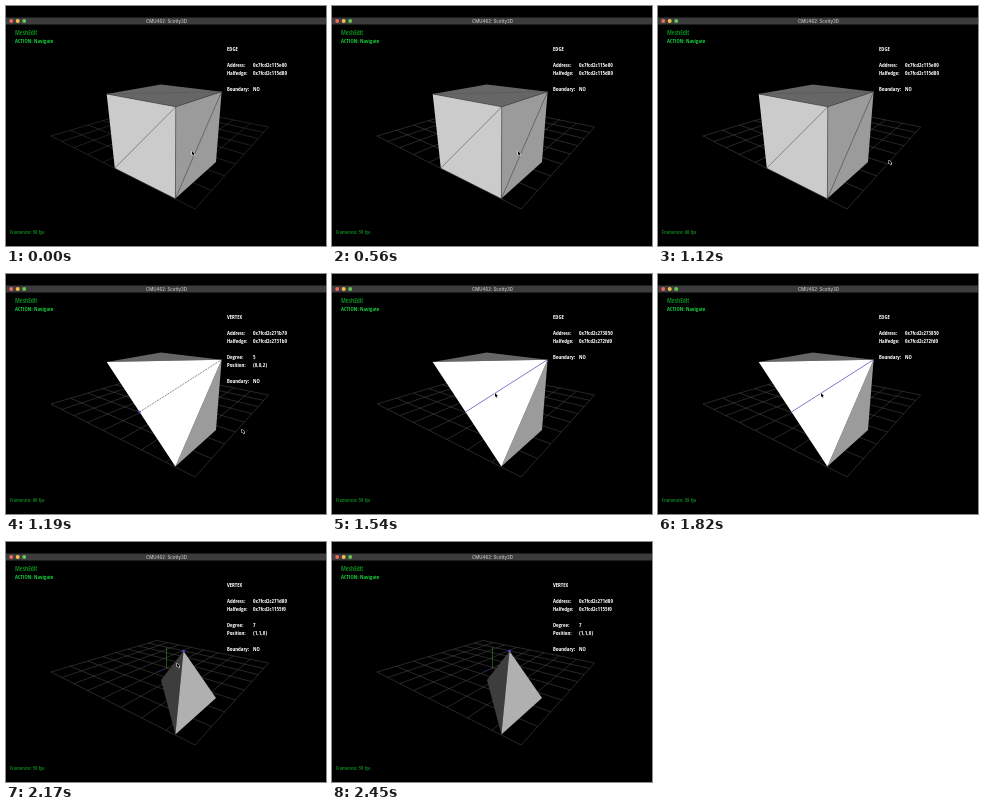
An HTML page with a canvas for the animation above (2940 ms loop, 320 by 240 pixels).

```html
<!DOCTYPE html>
<html lang="en">
<head>
<meta charset="utf-8">
<title>Mesh editor</title>
<style>
html, body { margin: 0; width: 100%; height: 100%; overflow: hidden; background: #000; }
canvas { display: block; }
</style>
</head>
<body>
<canvas width="320" height="240"></canvas>
<script>
const ctx = document.querySelector('canvas').getContext('2d');
const LOOP = 2940, STEP = 70;
const OSD = '"Open Sans Condensed", "Open Sans", sans-serif';

// Cube corners: top a-d, bottom e-h
const a = [100.7, 88], b = [154.8, 78.6], c = [215.6, 85.7], d = [169.8, 100.8];
const e = [108.8, 162], f = [169.4, 192.5], g = [210, 156], h = [155, 138];
const mid = [133.5, 138], apex = [177.5, 109];

// Ground corners as x, y, perspective weight
const left = [45, 130, .465], back = [151, 98.5, .737];
const right = [262.6, 121, .535], front = [189, 203, .263];

const edge = (address, halfedge) =>
  ['EDGE', , 'Address:|' + address, 'Halfedge:|' + halfedge, , 'Boundary:|NO'];
const vertex = (address, halfedge, degree, position) =>
  ['VERTEX', , 'Address:|' + address, 'Halfedge:|' + halfedge, ,
    'Degree:|' + degree, 'Position:|' + position, , 'Boundary:|NO'];

const panels = [
  [0, edge('0x7fcd2c115e00', '0x7fcd2c115d80')],
  [1190, vertex('0x7fcd2c271b70', '0x7fcd2c2731b0', 5, '(0,0,2)')],
  [1470, edge('0x7fcd2c273850', '0x7fcd2c272fd0')],
  [1890, vertex('0x7fcd2c271d80', '0x7fcd2c1155f0', 7, '(1,1,0)')]
];
const rates = [[0, 58], [560, 59], [980, 60], [1470, 59]];
const pointer = [
  [0, 186, 145], [910, 186, 145], [1120, 231, 154], [1190, 236, 155], [1260, 236, 155],
  [1470, 163, 119], [1820, 163, 119], [1890, 171, 121], [LOOP, 171, 121]
];

const current = (list, t) => list.findLast(item => item[0] <= t)[1];

function text(str, x, y, color, font) {
  ctx.font = font;
  ctx.fillStyle = color;
  ctx.fillText(str, x, y);
}

function trace(points) {
  ctx.beginPath();
  points.forEach(p => ctx.lineTo(p[0], p[1]));
}

function face(color, ...points) {
  trace(points);
  ctx.closePath();
  ctx.fillStyle = color;
  ctx.fill();
}

function line(color, width, ...points) {
  trace(points);
  ctx.strokeStyle = color;
  ctx.lineWidth = width;
  ctx.stroke();
}

function dot(color, x, y, r) {
  ctx.beginPath();
  ctx.arc(x, y, r, 0, 7);
  ctx.fillStyle = color;
  ctx.fill();
}

function between(p, q, k) {
  const wp = p[2] * (1 - k), wq = q[2] * k, w = wp + wq;
  return [(p[0] * wp + q[0] * wq) / w, (p[1] * wp + q[1] * wq) / w];
}

function ground(color) {
  for (let k = 0; k <= 1; k += 1 / 8) {
    line(color, .55, between(left, front, k), between(back, right, k));
    line(color, .55, between(left, back, k), between(front, right, k));
  }
  line('#222c78', .6, [161, 126], [150, 130.5]);
  line('#7a2020', .6, [161, 126], [172, 129]);
  line('#2c7a32', .7, [160.5, 126], [160.5, 105]);
}

function cube() {
  face('#666', a, b, c, d);
  face('#cbcbcb', a, d, f, e);
  face('#9b9b9b', d, c, g, f);
  line('#555', .5, a, c);
  line('#555', .6, e, d);
  line('#444', .6, f, c);
  line('#333', .5, a, d, c);
  line('#444', .5, d, f);
}

function wedge(selected) {
  face('#666', a, b, c);
  face('#9b9b9b', c, g, f);
  face('#fff', a, c, f);
  if (!selected) ctx.setLineDash([2, 1]);
  line(selected ? '#4444b8' : '#555', .7, mid, c);
  ctx.setLineDash([]);
  if (!selected) dot('#4a4ad0', ...mid, 1.2);
}

function pyramid() {
  face('#3d3d3d', apex, h, f);
  face('#b0b0b0', apex, g, f);
  dot('#5a4ad0', ...apex, 1.3);
}

function cursor(t) {
  const i = pointer.findIndex(p => p[0] > t);
  const [t0, x0, y0] = pointer[i - 1], [t1, x1, y1] = pointer[i];
  const k = (t - t0) / (t1 - t0);
  ctx.save();
  ctx.translate(x0 + (x1 - x0) * k, y0 + (y1 - y0) * k);
  ctx.scale(.8, .8);
  trace([[0, 0], [0, 5], [1.2, 4], [2.1, 6], [3, 5.6], [2.2, 3.7], [3.7, 3.6]]);
  ctx.closePath();
  ctx.lineWidth = 1.2;
  ctx.strokeStyle = '#fff';
  ctx.stroke();
  ctx.fillStyle = '#000';
  ctx.fill();
  ctx.restore();
}

function titleBar() {
  ctx.fillStyle = '#3c3c3c';
  ctx.fillRect(0, 11.5, 320, 7);
  ['#ed6a5e', '#f4be4f', '#61c554'].forEach((color, i) => dot(color, 5.2 + i * 6.5, 15, 2));
  ctx.textAlign = 'center';
  text('CMU462: Scotty3D', 160.5, 16.5, '#c4c4c4', '500 4.4px Inter, sans-serif');
  ctx.textAlign = 'left';
}

function labels(t) {
  text('MeshEdit', 9, 29.2, '#0b8420', '600 condensed 6.2px ' + OSD);
  text('ACTION: Navigate', 9, 37.1, '#18c840', 'bold condensed 5.5px ' + OSD);
  text(`Framerate: ${current(rates, t)} fps`, 4, 227.5, '#0b7a1c', '600 condensed 5px ' + OSD);
  current(panels, t).forEach((row, i) => row.split('|').forEach((part, col) =>
    text(part, 221 + col * 26, 45 + i * 8, '#fff', 'bold condensed 5.5px ' + OSD)));
}

function draw(now) {
  const t = Math.floor(now % LOOP / STEP) * STEP;
  ctx.fillStyle = '#000';
  ctx.fillRect(0, 0, 320, 240);
  titleBar();
  ground(t < 560 ? '#3a3a3a' : '#484848');
  if (t < 1190) cube();
  else if (t < 1890) wedge(t >= 1470);
  else pyramid();
  labels(t);
  if (t < 2380) cursor(t);
  requestAnimationFrame(draw);
}
requestAnimationFrame(draw);
</script>
</body>
</html>
```
